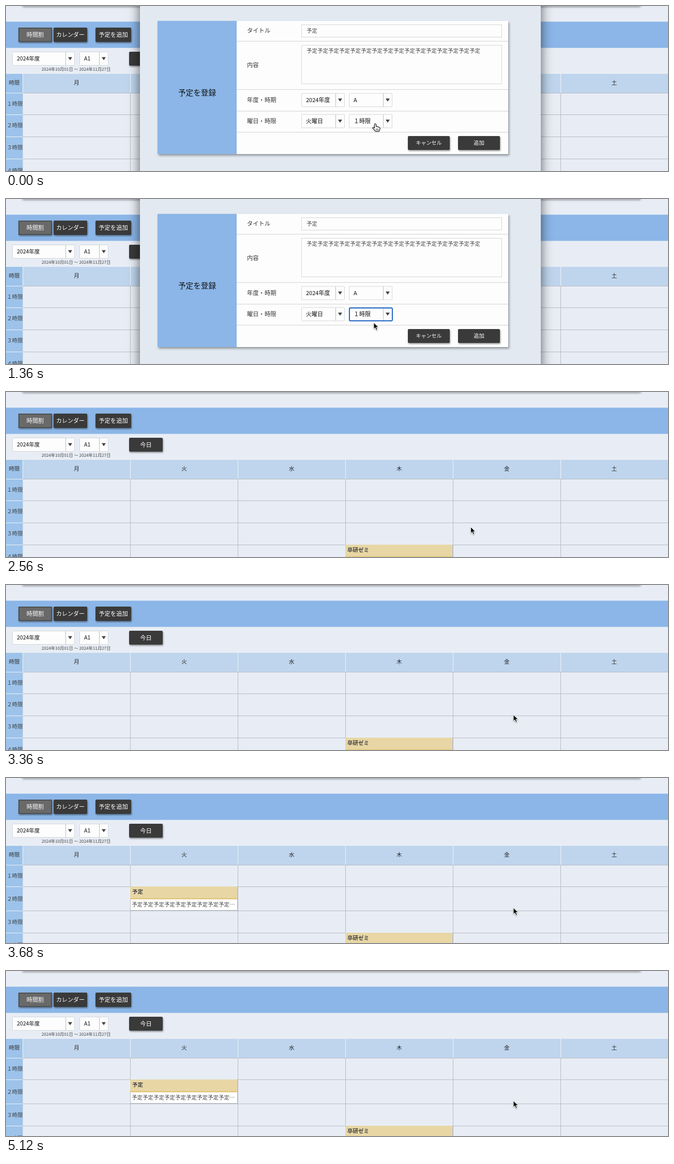
Animation, 1280 px wide and 321 px high, one loop 5.28 s. Source, as an HTML page:

```html
<!DOCTYPE html>
<html lang="ja">
<head>
<meta charset="utf-8">
<title>予定を登録</title>
<style>
html, body { margin: 0; width: 100%; height: 100%; overflow: hidden; background: #e8edf5; }
svg { display: block; width: 100vw; height: 100vh; }
text { font-family: "Noto Sans CJK JP", "Noto Sans CJK", sans-serif; white-space: pre; }
.lift { filter: drop-shadow(1px 2px 1.5px rgba(0,0,0,.42)); }
.panel { filter: drop-shadow(2px 3px 2px rgba(0,0,0,.36)); }
.sheet { filter: drop-shadow(0 0 11px rgba(0,0,0,.62)); }
.edge { filter: drop-shadow(0 1px 2px rgba(0,0,0,.5)); }
.pointer { filter: drop-shadow(0 1px 1px rgba(0,0,0,.35)); }
.icon { fill: none; stroke: #2b3440; stroke-width: 1.3; stroke-linejoin: round; stroke-linecap: round; }
</style>
</head>
<body>
<svg id="stage" viewBox="0 0 1280 321" preserveAspectRatio="none"></svg>
<script>
const LOOP = 5280;
const BLUE = '#8bb6e7', SIDE = '#9dc3ea', HEAD = '#bfd5ed', PAGE = '#e8edf5';
const GRID = '#b6bac2', PALE = '#eef3f9', INK = '#333';

const rect = (x, y, w, h, fill, extra = '') =>
  `<rect x="${x}" y="${y}" width="${w}" height="${h}" fill="${fill}" ${extra}/>`;
const hline = (x1, x2, y, c) => rect(x1, Math.floor(y), x2 - x1, 1, c);
const vline = (x, y1, y2, c) => rect(Math.floor(x), y1, 1, y2 - y1, c);
const path = (d, extra = '') => `<path d="${d}" ${extra}/>`;
// y is the middle of the glyphs
const text = (x, y, s, size, fill = INK, extra = '') =>
  `<text x="${x}" y="${(y + size * .38).toFixed(2)}" font-size="${size}" fill="${fill}" ${extra}>${s}</text>`;
const MID = 'text-anchor="middle"', FIRM = 'font-weight="500"', BOLD = 'font-weight="700"';
const group = (body, extra = '') => `<g ${extra}>${body}</g>`;

function button(x, y, w, h, label, size) {
  return rect(x, y, w, h, '#3a3a3a', 'rx="2" class="lift"') +
    text(x + w / 2, y + h / 2, label, size, '#fff', MID + ' ' + FIRM);
}

function select(x, y, w, split, label, size, id = '') {
  const ax = (split + x + w) / 2, ay = y + 13;
  return rect(x + .5, y + .5, w - 1, 26, '#fdfdfd', 'stroke="#d3d6da" rx="1"') +
    vline(split, y + 1, y + 26, '#b9bcc0') +
    path(`M${ax - 4} ${ay - 2.5}h8l-4 6z`, 'fill="#444"') +
    text(x + 9, y + 13.5, label, size, '#111', FIRM + (id && ` id="${id}"`));
}

function eventCard(x, y, w, title, detail, size) {
  return rect(x + .5, y + .5, w, 46, '#fff', `stroke="${GRID}"`) +
    rect(x, y, w, 23, '#e8d7a5') + rect(x, y + 22.5, w, 2.5, '#e2c67c') +
    text(x + 4, y + 10.5, title, 10.5, '#444', BOLD) +
    text(x + 3, y + 35, detail, size, '#444');
}

function timetable(x, top, withPlan) {
  const left = x + 32.5, cw = (1280 - left) / 6, first = top + 37, col = i => left + i * cw;
  let s = rect(x, top, 1280 - x, 37, HEAD) + rect(x, top, 32.5, 340, SIDE);
  s += text(x + 16, top + 17.5, '時限', 10.5, INK, MID);
  [...'月火水木金土'].forEach((d, i) => {
    s += text(col(i) + cw / 2, top + 17.5, d, 10.5, '#222', MID + ' ' + FIRM);
    s += vline(col(i), top, first, PALE) + vline(col(i), first, 340, i ? GRID : '#cbd3dd');
  });
  s += hline(x, left, first, PALE) + hline(left, 1280, first, GRID);
  let y = first, cards = '';
  [...'１２３４５６７'].forEach((n, i) => {
    const planned = withPlan && i === 1, seminar = i === 3;
    const h = planned || seminar ? 47.2 : 42.7;
    s += text(x + 17, y + h / 2 - .5, n + '時限', 10.3, '#3a4048', MID);
    if (planned) {
      const pairs = Math.floor((cw - 6) / 10.5) - 1;
      cards += eventCard(Math.floor(col(1)), Math.floor(y), cw - 1, '予定',
        '予定'.repeat(10).slice(0, pairs) + '…', 10.5);
    }
    if (seminar) cards += eventCard(Math.floor(col(3)), Math.floor(y), cw - 1, '卒研ゼミ', '16:00〜 15-601A', 11.7);
    y += h;
    s += hline(x, left, y, PALE) + hline(left, 1280, y, GRID);
  });
  return s + cards;
}

function schedulePage(withPlan) {
  return rect(0, 0, 1280, 321, PAGE) +
    rect(32, -10, 1195, 10.5, '#d4d8de', 'class="edge"') +
    rect(0, 30.5, 1280, 51, BLUE) +
    button(24, 42, 65, 28, '', 11) +
    rect(25, 43, 63, 26, '#696969', 'stroke="#505050" stroke-width="2"') +
    text(56.5, 56, '時間割', 11.2, '#fff', MID + ' ' + FIRM) +
    button(92, 42, 65, 28, 'カレンダー', 11) +
    button(173, 42, 69, 28, '予定を追加', 11.3) +
    select(12, 89, 121, 115, '2024年度', 10.5) +
    select(142, 89, 56, 180, 'A1', 10.5) +
    text(135.5, 123, '2024年10月01日 〜 2024年11月27日', 8.2, '#444', MID) +
    button(238, 89, 65, 27, '今日', 11.3) +
    timetable(0, 132, withPlan);
}

function dialog() {
  const labels = [['タイトル', 47.5], ['内容', 114.5], ['年度・時期', 182.5], ['曜日・時限', 224]];
  const box = 'stroke="#d6d6d6"';
  return rect(259, -40, 775, 401, '#e2e9f1', 'class="sheet"') +
    rect(293, 29, 678, 259, '#fdfdfd', 'class="panel"') +
    rect(293, 29, 153, 259, BLUE) +
    text(369.5, 168, '予定を登録', 14.6, '#111', MID) +
    [68, 162, 204, 245].map(y => hline(446, 971, y, '#d2d2d2')).join('') +
    labels.map(([s, y]) => text(466, y, s, 11.3)).join('') +
    rect(571.5, 36.5, 387, 24, '#fdfdfd', box) + text(581, 48, '予定', 10.5, '#444') +
    rect(571.5, 76.5, 387, 75, '#fdfdfd', box) + text(581, 87.5, '予定'.repeat(16), 10.5, '#444') +
    select(571, 169.5, 84, 637, '2024年度', 11) + select(663, 169.5, 84, 729, 'A', 11) +
    select(571, 210.5, 84, 637, '火曜日', 11) + select(663, 210.5, 84, 729, '１時限', 11, 'period') +
    rect(664, 212, 83, 25, 'none', 'stroke="#1f66c1" stroke-width="2" rx="2" id="ring"') +
    button(777, 253, 81, 27, 'キャンセル', 10) + button(874, 253, 81, 27, '追加', 10.5);
}

function sidebar() {
  const cap = path('M18 50l13-6 13 6-13 6zM22 52.5v6q9 5 18 0v-6M43 51v8');
  const book = y => group(
    path('M25 83h17v18H25zM29 81h9v4h-9zM29 89h10M29 93h10M29 97h7') +
    path('M19.500 83h4v14l-2 4-2-4zM19.500 86h4'), `transform="translate(0 ${y - 91})"`);
  let people = path('M17 241h26v20H17zM17 251h26M25.700 241v20M34.300 241v20');
  for (let i = 0; i < 6; i++) {
    const x = 21.4 + i % 3 * 8.6, y = 244.5 + (i > 2) * 10;
    people += path(`M${x - 1.5} ${y}a1.500 1.500 0 1 0 3 0a1.500 1.500 0 1 0 -3 0M${x - 2.5} ${y + 5}q2.500 -5 5 0`);
  }
  const lens = path('M18 290a8.500 8.500 0 1 0 17 0a8.500 8.500 0 1 0 -17 0M32.500 296.500l8 7.500');
  const names = ['時間割', '教材一覧', '提出状況一覧', 'コンテンツ検索', 'メッセージ一覧', 'オンライン授業情報', 'コース検索'];
  const items = names.map((s, i) =>
    rect(0, 32 + i * 40, 177, 38.5, BLUE) + text(65, 51 + i * 40, s, 15.4, '#222')).join('');
  return rect(0, 0, 190, 321, '#fafafa') + rect(0, 310, 177, 11, PAGE) +
    rect(0, 30.5, 177, 280, '#e9f0f8') + group(items, 'clip-path="url(#side)"') +
    group(cap + [91, 131, 171, 211].map(book).join('') + people + lens, 'class="icon"') +
    group(path('M146 5a11 11 0 1 0 22 0a11 11 0 1 0 -22 0M163 5h-12M155.500 .5l-4.500 4.500 4.500 4.500'),
      'class="icon" style="stroke:#777"') +
    vline(178, 0, 321, '#e4e4e4') + rect(184, 0, 6, 321, 'url(#fade)');
}

const hand = path('M4.500 9V2.200q0-1.700 1.500-1.700t1.500 1.700V6q2.600-.8 3 .8 2.300-.6 2.600 1 1.900-.2 1.900 1.700 0 3.500-2 5.500H6.500Q4.500 12.500 1 9.200 .8 7.200 3 7.800z',
  'fill="#fff" stroke="#111" stroke-width="1.100" stroke-linejoin="round"') +
  path('M7.700 10v3M9.700 10v3M11.500 10v3', 'stroke="#111" stroke-width=".8"');
const arrow = path('M0 0V12.500L2.900 9.800 5 14.800 7.300 13.800 5.200 9H9.200z',
  'fill="#080808" stroke="#fff" stroke-width="1" stroke-linejoin="round"');

document.getElementById('stage').innerHTML =
  `<defs><clipPath id="side">${rect(0, 0, 177, 321, '#000')}</clipPath>
  <linearGradient id="fade"><stop offset="0" stop-color="#999" stop-opacity="0"/>
  <stop offset="1" stop-color="#888" stop-opacity=".75"/></linearGradient></defs>` +
  group(schedulePage(false), 'id="before"') +
  group(schedulePage(true), 'id="after"') +
  group(rect(0, 0, 1280, 321, PAGE) + timetable(189.5, -14.3, true) + sidebar(), 'id="reload"') +
  group(dialog(), 'id="dialog"') +
  group(hand, 'id="hand" class="pointer" transform="translate(708 228.500)"') +
  group(arrow, 'id="arrow" class="pointer"');

const el = id => document.getElementById(id);
const show = (id, on) => { el(id).style.display = on ? '' : 'none'; };
const ease = p => p * p * (3 - 2 * p);

// time, x, y of the pointer tip
const TRACK = [[0, 713, 230], [880, 713, 230], [1280, 711, 240.5], [1760, 711, 240.5],
  [2320, 898.5, 262.5], [2800, 898.5, 262.5], [3280, 981, 252.5], [LOOP, 981, 252.5]];

function pointerAt(t) {
  const i = TRACK.findIndex(k => k[0] > t);
  const [t0, x0, y0] = TRACK[i - 1], [t1, x1, y1] = TRACK[i];
  const p = ease((t - t0) / (t1 - t0));
  return [x0 + (x1 - x0) * p, y0 + (y1 - y0) * p];
}

function draw(t) {
  const reloading = t >= 3520 && t < 3600;
  show('before', t < 3520);
  show('reload', reloading);
  show('after', t >= 3600);
  show('dialog', t < 2560);
  show('ring', t >= 720 && t < 2400);
  el('period').textContent = t < 1600 ? '１時限' : '２時限';
  show('hand', t < 720);
  show('arrow', t >= 720);
  const [x, y] = pointerAt(t);
  el('arrow').setAttribute('transform', `translate(${x.toFixed(2)} ${y.toFixed(2)})`);
}

const start = performance.now();
function tick() {
  draw((performance.now() - start) % LOOP);
  requestAnimationFrame(tick);
}
tick();
</script>
</body>
</html>
```
